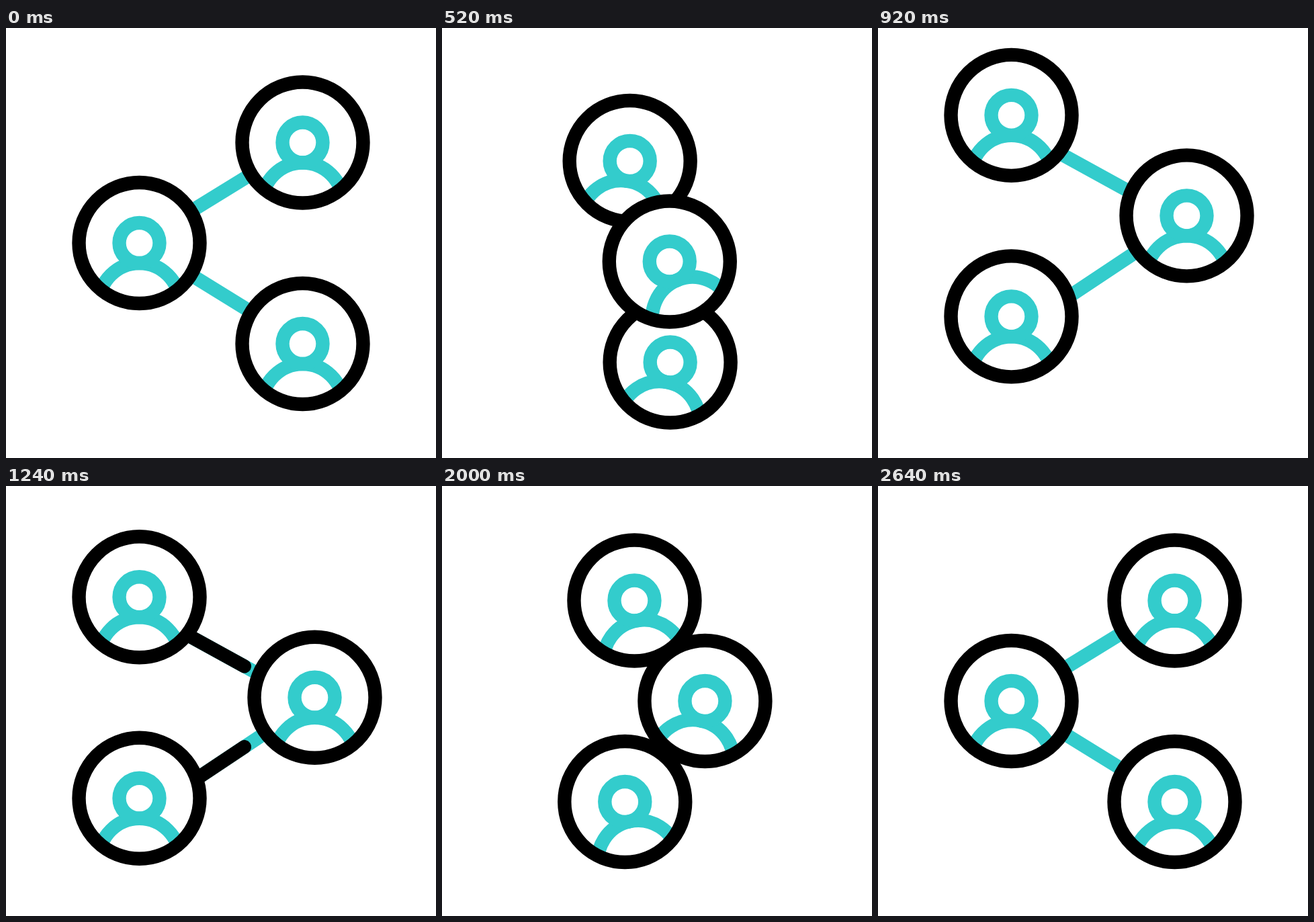
These frames come from a looping animation (640x640 px, 3 s). An HTML page with a canvas:

```html
<!DOCTYPE html>
<html>
<head>
<meta charset="utf-8">
<style>
html, body { margin: 0; height: 100%; overflow: hidden; background: #fff; }
canvas { display: block; }
</style>
</head>
<body>
<canvas id="stage" width="640" height="640"></canvas>
<script>
const ctx = document.getElementById('stage').getContext('2d');
const TEAL = '#33cccc', LOOP = 3000, LEFT = 198.5;

const mix = (a, b, k) => a + (b - a) * k;
const smooth = u => u * u * (3 - 2 * u);

// cubic-bezier(x1, 0, x2, 1), solved by bisection
const bezier = (x1, x2) => u => {
  let lo = 0, hi = 1;
  for (let i = 0; i < 24; i++) {
    const s = (lo + hi) / 2, r = 1 - s;
    if (3 * x1 * s * r * r + 3 * x2 * s * s * r + s * s * s < u) lo = s; else hi = s;
  }
  return smooth(lo);
};

// keys: [time, value, easing into this key]
function track(t, keys) {
  if (t <= keys[0][0]) return keys[0][1];
  for (let i = 1; i < keys.length; i++) {
    const [t0, v0] = keys[i - 1], [t1, v1, ease = smooth] = keys[i];
    if (t < t1) return mix(v0, v1, ease((t - t0) / (t1 - t0)));
  }
  return keys[keys.length - 1][1];
}

const lift = [[80, 0], [480, 29], [960, -42], [1320, 0]];
const skew = [[80, 0], [920, 1], [1720, 1], [2320, -0.5], [2640, 0]];
const head = [[960, 0.22], [1400, 0.76]];
const tail = [[1440, 0.22], [1720, 0.76]];

function person(y, home, away, out, back, ease, tiltOut, tiltBack) {
  return {
    y,
    x: [[out[0], home], [out[1], away], [back[0], away], [back[1], home, ease]],
    tilt: [[out[0], 0], [(out[0] + out[1]) / 2, tiltOut], [out[1], 0],
           [1720, 0], [2160, tiltBack], [2610, 0]]
  };
}
const top_ = person(170.5, 441.5, LEFT, [80, 800], [1720, 2560], bezier(0.168, 0.662), -9.5, 12.8);
const bottom = person(470, 441.5, LEFT, [200, 920], [1720, 2640], bezier(0.187, 0.683), -10.6, 18);
const middle = person(320, LEFT, 459.5, [80, 920], [1720, 2560], smooth, 22.5, -16.2);

function ring(y, radius, width, color) {
  ctx.beginPath();
  ctx.arc(0, y, radius, 0, 2 * Math.PI);
  ctx.lineWidth = width;
  ctx.strokeStyle = color;
  ctx.stroke();
}

function drawPerson(p, t) {
  ctx.save();
  ctx.translate(track(t, p.x), p.y);
  ctx.save();
  ctx.beginPath();
  ctx.arc(0, 0, 90, 0, 2 * Math.PI);
  ctx.fillStyle = '#fff';
  ctx.fill();
  ctx.clip();
  ctx.rotate(-track(t, p.tilt) * Math.PI / 180);
  ring(90, 60, 20.4, TEAL);
  ctx.restore();
  ring(0, 30, 20.4, TEAL);
  ring(0, 90, 20.4, '#000');
  ctx.restore();
}

function drawLink(p, t, endShift, middleShift) {
  const k = track(t, skew);
  const x0 = track(t, p.x), y0 = p.y + endShift * k;
  const x1 = track(t, middle.x), y1 = middle.y + middleShift * k;
  const line = (from, to, color) => {
    ctx.beginPath();
    ctx.moveTo(mix(x0, x1, from), mix(y0, y1, from));
    ctx.lineTo(mix(x0, x1, to), mix(y0, y1, to));
    ctx.strokeStyle = color;
    ctx.stroke();
  };
  ctx.lineWidth = 20.4;
  ctx.lineCap = 'round';
  line(0, 1, TEAL);
  if (t > 960 && t < 1720) line(track(t, tail), track(t, head), '#000');
}

function draw(now) {
  const t = now % LOOP;
  ctx.fillStyle = '#fff';
  ctx.fillRect(0, 0, 640, 640);
  ctx.save();
  ctx.translate(0, track(t, lift));
  drawLink(top_, t, 17, 11);
  drawLink(bottom, t, 27.5, 4);
  [top_, bottom, middle].forEach(p => drawPerson(p, t));
  ctx.restore();
  requestAnimationFrame(draw);
}
requestAnimationFrame(draw);
</script>
</body>
</html>
```
